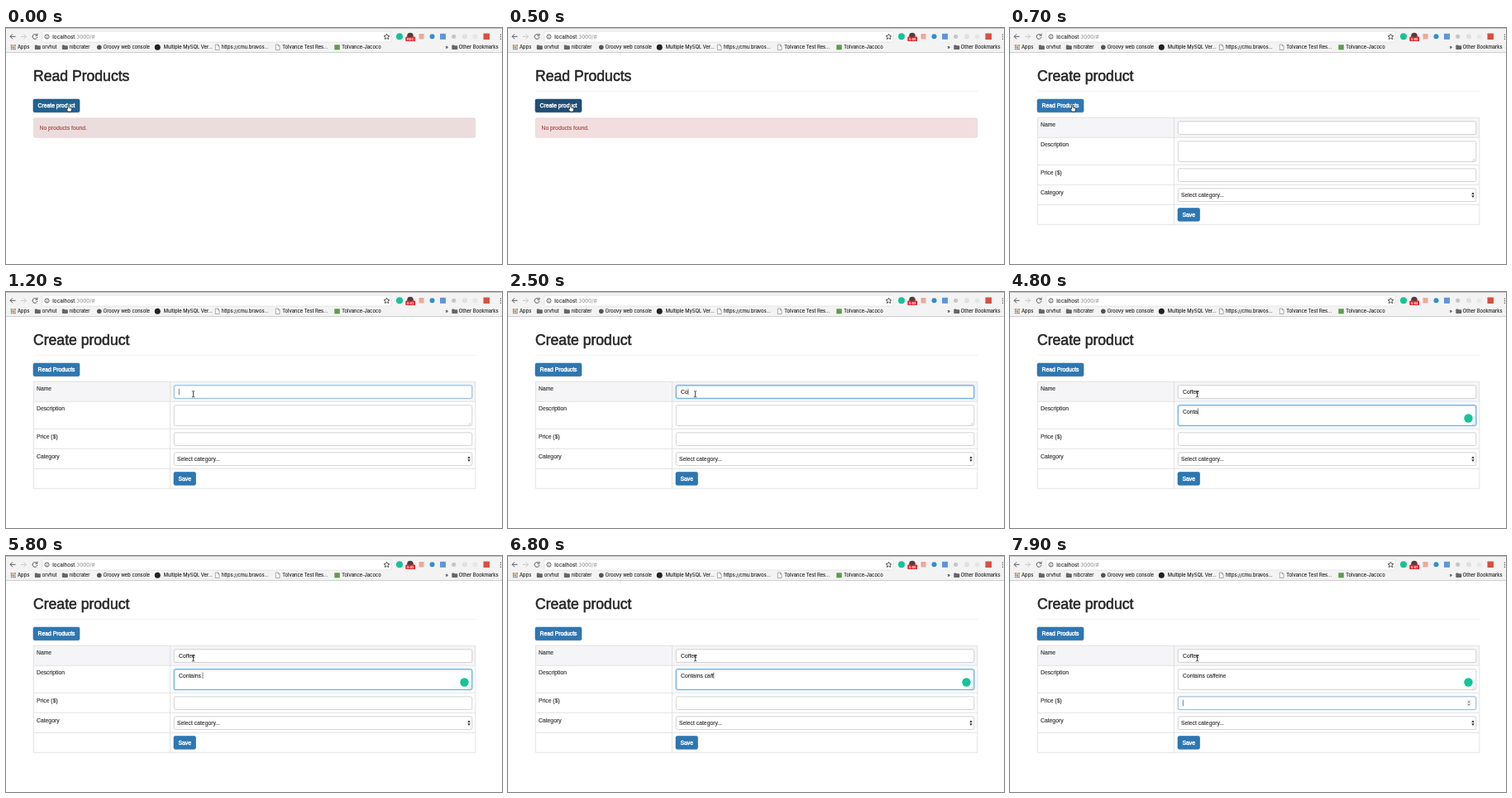
These frames come from a looping animation (600x285 px, 8000 ms). An HTML page:

```html
<!DOCTYPE html>
<html lang="en">
<head>
<meta charset="utf-8">
<title>Create product</title>
<style>
html, body { margin: 0; width: 100%; height: 100%; overflow: hidden; background: #fff; }
svg { display: block; width: 100%; height: 100%; }
text { font: 6.8px "Liberation Sans", Arial, sans-serif; fill: #262626; stroke: #262626; stroke-width: .1; white-space: pre; }
.bar text { font: 5.8px Inter, sans-serif; fill: #1c1c1c; stroke: #1c1c1c; }
.bar .url { font-size: 6.35px; }
.bar .rec { font: bold 4.3px "Liberation Sans", sans-serif; fill: #fff; stroke: none; text-anchor: middle; }
.title { font-size: 17.6px; stroke-width: .55; }
.btn text { fill: #fff; stroke: #fff; stroke-width: .4; text-anchor: middle; }
.btn rect { fill: #2d77b2; stroke: #2a6ba2; stroke-width: .6; }
.field { fill: #fff; stroke: #c8c8c8; stroke-width: .8; }
.focus { fill: none; stroke: #66afe9; }
.line { fill: none; stroke: #ddd; stroke-width: .8; }
.icon { fill: none; stroke: #5a5a5a; stroke-width: 1; }
</style>
</head>
<body>
<svg viewBox="0 0 600 285" preserveAspectRatio="none">
  <defs>
    <path id="folder" d="M0 1q0-.8.8-.8h1.8l.8.9h2.8q.8 0 .8.8v3.2q0 .8-.8.8H.8Q0 5.900 0 5.100z" fill="#666"/>
    <path id="doc" d="M0 0h3l1.700 1.700v4.800H0zM3 0v1.700h1.700" fill="#fff" stroke="#777" stroke-width=".6"/>
  </defs>
  <rect width="600" height="285" fill="#fff"/>

  <g class="bar">
    <rect width="600" height="29.500" fill="#f3f3f3"/>
    <path d="M0 .5h600" stroke="#bdbdbd"/>
    <path d="M0 29.500h600" stroke="#c4c4c4" stroke-width=".8"/>
    <rect x="44" y="4" width="422" height="13" rx="1.500" fill="#fff" stroke="#d9d9d9" stroke-width=".6"/>
    <path class="icon" d="M11.500 10.300H5M8 7.300l-3 3 3 3"/>
    <path class="icon" style="stroke:#c8c8c8" d="M18 10.300h6.500M21.500 7.300l3 3-3 3"/>
    <path class="icon" d="M37 8.300a2.900 2.900 0 1 0 .9 2.500M38 6.700v2.500h-2.500"/>
    <circle class="icon" cx="49.500" cy="10.500" r="2.500" stroke-width=".7"/>
    <path d="M49.500 10v2M49.500 8.700v.7" stroke="#5a5a5a" stroke-width=".7"/>
    <text class="url" x="56.300" y="12.700">localhost<tspan fill="#888" stroke="none">:3000/#</tspan></text>
    <path class="icon" stroke-width=".7" d="M460.500 7l1 2.300 2.500.2-1.900 1.600.6 2.500-2.200-1.300-2.200 1.300.6-2.500-1.900-1.600 2.500-.2z"/>
    <circle cx="476" cy="10.300" r="4" fill="#15c39a"/>
    <circle cx="489" cy="9.500" r="3.800" fill="#4a4040"/>
    <rect x="483.300" y="10.500" width="11.800" height="5.600" rx="1" fill="#e0262b"/>
    <text id="rec" class="rec" x="489.200" y="14.900">REC</text>
    <rect x="499.500" y="7" width="6" height="6.500" fill="#f0a898"/>
    <circle cx="515.500" cy="10.300" r="3" fill="#2f8fd0"/>
    <rect x="525" y="6.800" width="7" height="7" fill="#5b96dc"/>
    <circle cx="541.700" cy="10.300" r="2.600" fill="#c6c6c6"/>
    <circle cx="555" cy="10.300" r="3" fill="#e0e0e0"/>
    <circle cx="567.500" cy="10.300" r="3" fill="#e6e6e6"/>
    <rect x="577.500" y="6.500" width="7.500" height="7.500" fill="#d8503f"/>
    <path d="M598.400 7.500v6.500" stroke="#5a5a5a" stroke-width="1.200" stroke-dasharray="1.200 1.400"/>

    <g transform="translate(.8 0)">
      <g id="apps"></g>
      <text x="13.300" y="25.300">Apps</text>
      <use href="#folder" x="34" y="20.200"/><text x="43" y="25.300">orvhut</text>
      <use href="#folder" x="67" y="20.200"/><text x="76" y="25.300">nibcrater</text>
      <circle cx="112" cy="23.300" r="2.800" fill="#555"/>
      <text x="117" y="25.300">Groovy web console</text>
      <circle cx="182.500" cy="23.300" r="3.500" fill="#222"/>
      <text x="190" y="25.300">Multiple MySQL Ver...</text>
      <use href="#doc" x="252.500" y="20"/><text x="260" y="25.300">https://cmu.bravos...</text>
      <use href="#doc" x="325.500" y="20"/><text x="333.500" y="25.300">Tolvance Test Res...</text>
      <rect x="396.500" y="20.300" width="6.500" height="6" fill="#5d9c4b"/>
      <text x="405.500" y="25.300">Tolvance-Jacoco</text>
      <text x="530.700" y="25.300">»</text>
      <use href="#folder" x="538.500" y="20.200"/><text x="547" y="25.300">Other Bookmarks</text>
    </g>
  </g>

  <path id="rule" d="M33 76.400h535" stroke="#eee" stroke-width=".8"/>
  <text id="title" class="title" x="33" y="64.300"></text>
  <g class="btn">
    <rect id="navBox" x="33" y="86" width="56" height="15.700" rx="1.700"/>
    <text id="nav" x="61" y="96.300"></text>
  </g>

  <g id="list">
    <rect id="alert" x="33.300" y="108.800" width="534.500" height="23.500" rx="2" stroke="#ebccd1" stroke-width=".6"/>
    <text x="40.500" y="122.900" style="fill:#9c4340;stroke:#9c4340">No products found.</text>
  </g>

  <g id="form">
    <rect x="33" y="108.300" width="535" height="24" fill="#f5f4f6"/>
    <path class="line" d="M33.300 108.300h534.500v129H33.300zM198.500 108.300v129M33.300 132.300h534.500M33.300 165.300h534.500M33.300 189.300h534.500M33.300 213.500h534.500"/>
    <text x="37" y="119.400">Name</text>
    <text x="37" y="143.400">Description</text>
    <text x="37" y="176.500">Price ($)</text>
    <text x="37" y="200.500">Category</text>
    <g id="fields"></g>
    <rect class="field" x="203.300" y="193.800" width="360.500" height="15.700" rx="2"/>
    <text x="207" y="204">Select category...</text>
    <path d="M558.300 200.900l1.700-2.600 1.700 2.600zM558.300 202.300l1.700 2.600 1.700-2.600z" fill="#333"/>
    <path d="M559.500 160.700l3-3M561.500 160.700l1-1" stroke="#999" stroke-width=".5"/>
    <g class="btn">
      <rect x="203" y="217.600" width="26.500" height="15.700" rx="1.700"/>
      <text x="216.300" y="227.900">Save</text>
    </g>
    <circle id="badge" cx="554.500" cy="152.500" r="5.200" fill="#15c39a"/>
    <g id="spin">
      <rect x="552.800" y="174" width="4.600" height="7.500" rx="1" fill="#f4f4f4" stroke="#ccc" stroke-width=".4"/>
      <path d="M553.800 176.800l1.300-1.700 1.300 1.700zM553.800 178.700l1.300 1.700 1.300-1.700z" fill="#555"/>
    </g>
    <path id="caret" stroke="#222" stroke-width=".6"/>
  </g>

  <g id="hand">
    <path d="M-1-3.300q.9-.8 1.500.2v2.600l3 .8q.8.3.6 1.200l-.7 3H-.3L-2.700 1.500q.3-1.100 1.700 0z" fill="#fff" stroke="#111" stroke-width=".7"/>
  </g>
  <path id="beam" d="M-1.600-3.700Q-.1-3.700 0-2.800Q.1-3.700 1.600-3.700M0-2.800V2.900M-1.600 3.700Q-.1 3.700 0 2.800Q.1 3.700 1.600 3.700" fill="none" stroke="#222" stroke-width=".8"/>
</svg>
<script>
const LOOP = 8000, OPEN = 700, PRESS = 300, FADE = 400;
const $ = id => document.getElementById(id);
const clamp = v => Math.max(0, Math.min(1, v));
const show = (el, on) => el.setAttribute('visibility', on ? 'inherit' : 'hidden');

// Each field: box, focus interval, and the time of every key
const fields = [
  { y: 112.800, h: 15.700, base: 123, from: 1100, to: 3500, word: 'Coffee',
    keys: [2200, 2400, 2700, 2800, 3000, 3100] },
  { y: 136.800, h: 24.700, base: 146.800, from: 3500, to: 7800, word: 'Contains caffeine',
    keys: [4000, 4200, 4400, 4600, 4800, 5000, 5100, 5400, 5600, 6000, 6200, 6500, 6700, 7000, 7200, 7300, 7500] },
  { y: 169.800, h: 15.700, base: 180, from: 7800, to: LOOP, word: '', keys: [] }
];

function add(parent, tag, attrs) {
  const el = document.createElementNS('http://www.w3.org/2000/svg', tag);
  for (const k in attrs) el.setAttribute(k, attrs[k]);
  return parent.appendChild(el);
}

const colors = ['#d95040', '#e0a030', '#4a9a55', '#4a7fd0'];
for (let i = 0; i < 9; i++)
  add($('apps'), 'rect', { x: 5 + i % 3 * 2.200, y: 20.200 + Math.floor(i / 3) * 2.200,
    width: 1.600, height: 1.600, fill: colors[i % 4] });

for (const f of fields) {
  const box = { x: 203.300, y: f.y, width: 360.500, height: f.h, rx: 2 };
  add($('fields'), 'rect', { ...box, class: 'field' });
  f.ring = add($('fields'), 'g', {});
  add(f.ring, 'rect', { ...box, class: 'focus', 'stroke-width': 2.400, 'stroke-opacity': .22 });
  add(f.ring, 'rect', { ...box, class: 'focus', 'stroke-width': .9 });
  f.text = add($('fields'), 'text', { x: 209, y: f.base });
}

function drawField(f, t) {
  const count = f.keys.filter(k => k <= t).length;
  const active = t >= f.from && t < f.to;
  f.text.textContent = f.word.slice(0, count);
  f.ring.setAttribute('opacity', active ? clamp((t - f.from + 100) / FADE) : 0);
  if (!active) return;
  const last = count ? f.keys[count - 1] : f.from;
  const x = 209.300 + (count ? f.text.getComputedTextLength() : 0);
  $('caret').setAttribute('d', `M${x} ${f.base - 6.300}v7.600`);
  show($('caret'), Math.floor((t - last) / 500) % 2 === 0);
}

function draw(t) {
  const open = t >= OPEN;
  show($('list'), !open);
  show($('form'), open);
  show($('rule'), t >= 200);
  $('title').textContent = open ? 'Create product' : 'Read Products';
  $('nav').textContent = open ? 'Read Products' : 'Create product';
  $('navBox').style.fill = open ? '#2d77b2' : t < PRESS ? '#1f6391' : '#204d74';
  $('navBox').style.stroke = open ? '#2a6ba2' : '#1c4668';
  $('alert').style.fill = t < 200 ? '#ebdddd' : '#f2dede';
  $('rec').textContent = t < 300 ? 'REC' : '0:0' + Math.floor(t / 1000);

  show($('caret'), false);
  fields.forEach(f => drawField(f, t));
  show($('badge'), t >= fields[1].from);
  show($('spin'), t >= fields[2].from);

  const p = clamp((t - OPEN) / 350), e = p * p * (3 - 2 * p);
  const place = `translate(${75.500 + 151 * e} ${96.500 + 26.800 * e})`;
  const inside = p > .9;
  $('hand').setAttribute('transform', place);
  $('beam').setAttribute('transform', place);
  show($('hand'), open ? !inside : true);
  show($('beam'), inside);
}

const start = performance.now();
function tick() {
  draw((performance.now() - start) % LOOP);
  requestAnimationFrame(tick);
}
tick();
</script>
</body>
</html>
```
